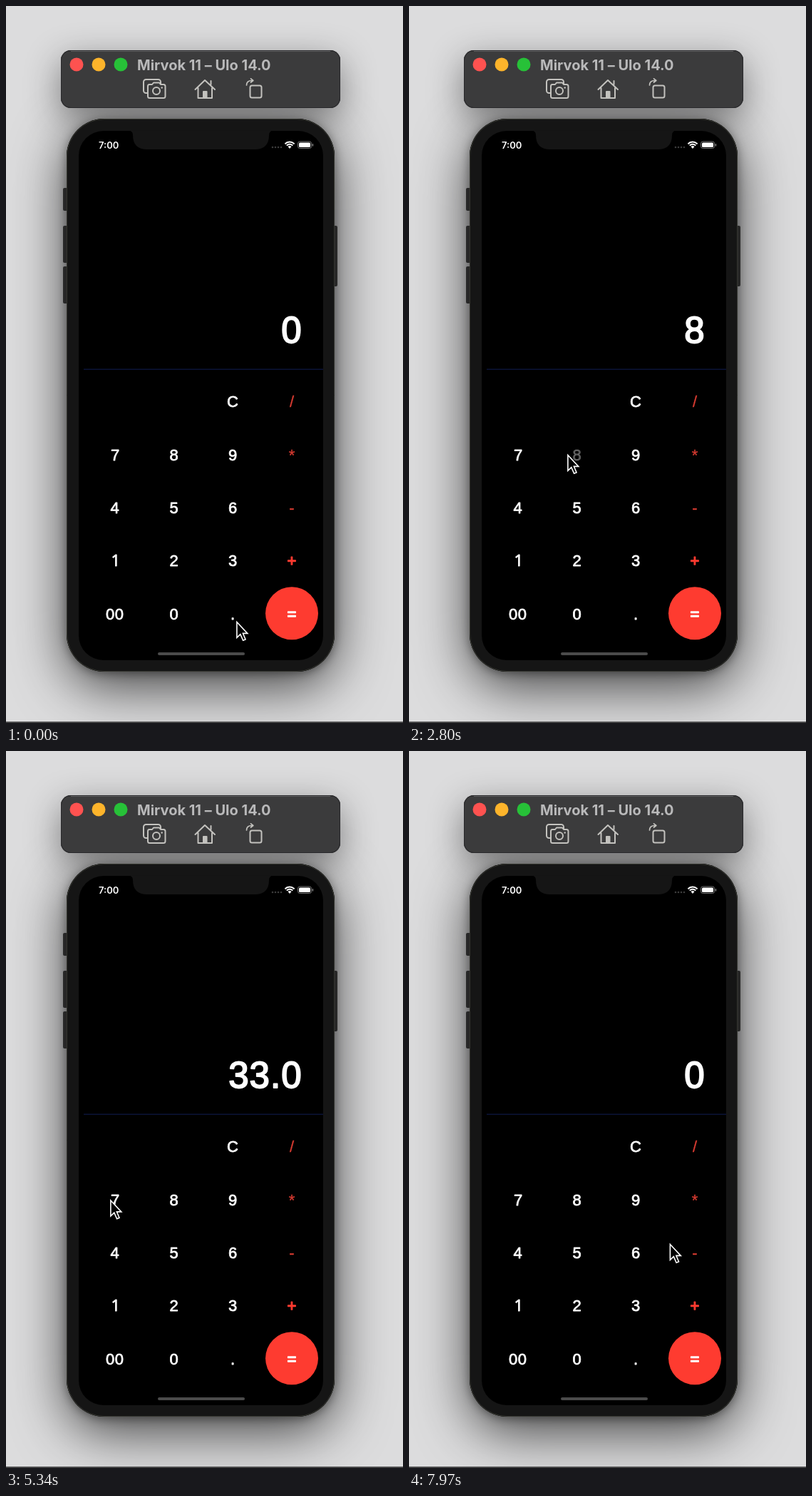
Recreate the animation shown at these times as an HTML page with a canvas. Size 557x1005 px, loop 8 s.

```html
<!DOCTYPE html>
<html lang="en">
<head>
<meta charset="utf-8">
<title>Calculator</title>
<style>
  html, body { margin: 0; width: 100%; height: 100%; overflow: hidden; background: #dcdcdd; }
  canvas { display: block; width: 100vw; height: 100vh; }
</style>
</head>
<body>
<canvas id="stage" width="557" height="1005"></canvas>
<script>
const W = 557, H = 1005, LOOP = 8000;
const RED = '#fe3b30', DIM_RED = '#d63b31', BODY = '#151515', ICON = '#c3c2be';
const view = document.getElementById('stage').getContext('2d');
const back = document.createElement('canvas');
back.width = W;
back.height = H;

// label, centre x, baseline, colour, extra weight
const keys = [
  ['C', 318, 562], ['/', 401, 562, DIM_RED],
  ['7', 153, 636.5], ['8', 235.5, 636.5], ['9', 318, 636.5], ['*', 401, 637, DIM_RED],
  ['4', 152.5, 711], ['5', 235.5, 711], ['6', 318, 711], ['-', 401, 711, DIM_RED],
  ['1', 152.5, 785], ['2', 235.5, 785], ['3', 318, 785], ['+', 401, 785, RED, .5],
  ['00', 152.5, 859.5], ['0', 235.5, 859.5], ['.', 318, 859.5], ['=', 401, 859.5, '#fff', .6]
];

// label, time down, time up
const taps = [
  ['2', 490, 600], ['5', 1000, 1110], ['+', 1600, 1710], ['8', 2650, 2780], ['=', 3610, 3720],
  ['/', 4540, 4650], ['7', 5420, 5530], ['=', 6400, 6510], ['C', 7510, 7620]
];

const readouts = [
  [0, '0'], [600, '2'], [1110, '25'], [2780, '8'], [3720, '33.0'],
  [5530, '7'], [6510, '4.71428571\n4285714'], [7620, '0']
];

// time, x, y of the pointer tip
const path = [
  [0, 323, 861.5], [430, 236, 778], [690, 236, 778], [930, 238, 704], [1180, 238, 704],
  [1490, 417, 766.5], [1850, 417, 766.5], [2480, 222, 627.5], [2900, 222, 627.5],
  [3500, 404, 853], [3880, 404, 853], [4340, 415.5, 583.5], [4490, 411, 563], [4780, 411, 563],
  [5340, 146, 628], [5680, 146, 628], [6220, 404, 852.5], [6700, 404, 852.5],
  [7170, 424, 625.5], [7460, 322, 556], [7700, 322, 556], [7970, 365.5, 689.5], [8000, 365.5, 689.5]
];

function box(c, x, y, w, h, r, fill, stroke, line = 1) {
  c.beginPath();
  c.roundRect(x, y, w, h, r);
  if (fill) { c.fillStyle = fill; c.fill(); }
  if (stroke) { c.strokeStyle = stroke; c.lineWidth = line; c.stroke(); }
}

function disc(c, x, y, r, fill) {
  c.beginPath();
  c.arc(x, y, r, 0, Math.PI * 2);
  c.fillStyle = fill;
  c.fill();
}

function line(c, d, color, width) {
  c.strokeStyle = color;
  c.lineWidth = width;
  c.stroke(new Path2D(d));
}

function castShadow(c, x, y, w, h, r, alpha, blur, drop) {
  c.save();
  c.shadowColor = `rgba(0,0,0,${alpha})`;
  c.shadowBlur = blur;
  c.shadowOffsetY = drop;
  box(c, x, y, w, h, r, BODY);
  c.restore();
}

function drawShadows(c) {
  castShadow(c, 77, 62, 392, 81, 14, .45, 50, 15);
  castShadow(c, 85, 158, 376, 775, 53, .72, 76, 20);
  castShadow(c, 85, 158, 376, 775, 53, .4, 14, 2);
}

function drawToolbar(c) {
  box(c, 77, 62, 392, 81, 14, '#3b3b3c');
  box(c, 77.5, 62.5, 391, 80, 13.5, null, '#28282b');
  line(c, 'M91 63.5H455', '#626263', 1);

  ['#fe5250', '#fdb42b', '#27c138'].forEach((color, i) => disc(c, 99 + 31 * i, 82, 9.5, color));
  c.fillStyle = '#b9b9ba';
  c.font = '700 20px Inter, "Open Sans", sans-serif';
  c.fillText('Mirvok 11 – Ulo 14.0', 184, 90);

  c.lineJoin = c.lineCap = 'round';
  // camera
  box(c, 193, 103, 24, 19, 3.5, null, ICON, 2);
  const cam = 'M201 110H205L207 107.5H215L217 110H221Q223.5 110 223.5 112.5V126.5Q223.5 129 221 129H201.5Q199 129 199 126.5V112.5Q199 110 201 110Z';
  c.fillStyle = '#3b3b3c';
  c.fill(new Path2D(cam));
  line(c, cam, ICON, 2);
  c.beginPath();
  c.arc(211, 119, 5, 0, Math.PI * 2);
  c.stroke();
  disc(c, 218.7, 114.5, 1.2, ICON);
  // house
  line(c, 'M265.5 117L279 104L293 117M269.5 115V129H289V115M287.5 110V105', ICON, 2);
  box(c, 276, 119, 6.5, 10, 1, ICON);
  // rotate
  box(c, 342.5, 111.5, 16, 17, 2.5, null, ICON, 2);
  line(c, 'M337.5 111Q337.5 104.5 345 104.5M343.5 101.8L346.8 104.5L343.5 107.2', ICON, 1.7);
}

function drawStatus(c) {
  c.fillStyle = '#fff';
  c.font = '600 13px Inter, "Open Sans", sans-serif';
  c.fillText('7:00', 130, 199.5);
  for (let i = 0; i < 4; i++) disc(c, 374 + 4 * i, 198, 1.3, '#3c3c3c');

  c.lineCap = 'butt';
  c.strokeStyle = '#fff';
  [[9, 2], [5.7, 2]].forEach(([r, w]) => {
    c.lineWidth = w;
    c.beginPath();
    c.arc(398, 199.5, r, -Math.PI * .76, -Math.PI * .24);
    c.stroke();
  });
  c.fillStyle = '#fff';
  c.fill(new Path2D('M398 200L395.5 197Q398 195.2 400.5 197Z'));

  box(c, 409.5, 190, 19, 9.5, 2.8, null, '#777');
  box(c, 411, 191.5, 16, 6.5, 1.6, '#fff');
  box(c, 429.7, 193, 1.4, 3.6, .7, '#888');
}

function drawPhone(c) {
  [[80, 255, 32], [80, 308, 52], [80, 365, 52], [458, 308, 85]]
    .forEach(([x, y, h]) => box(c, x, y, 7, h, 2, '#272727'));
  box(c, 85, 158, 376, 775, 53, BODY);
  box(c, 85.5, 158.5, 375, 774, 52.5, null, '#34352f');
  box(c, 102, 175, 343, 742, 35, '#000');

  c.fillStyle = BODY;
  c.fill(new Path2D('M172 174.5Q178 175 178 181Q178 201 198 201H349Q369 201 369 181Q369 175 375 174.5Z'));
  drawStatus(c);
  c.fillStyle = '#0b1338';
  c.fillRect(109, 508.5, 336, 1.5);
  box(c, 213, 906, 122, 4, 2, '#4b4b4b');
  disc(c, 401, 851.3, 37, RED);
}

function drawBack() {
  const c = back.getContext('2d');
  c.fillStyle = '#dcdcdd';
  c.fillRect(0, 0, W, H);
  drawShadows(c);
  drawToolbar(c);
  drawPhone(c);
  c.fillStyle = '#49494a';
  c.fillRect(0, 1003, W, 2);
}

const isDigit = ch => ch >= '0' && ch <= '9';
const face = (ch, size) => size + (ch === '1' ? 'px "Open Sans", sans-serif' : 'px "Liberation Sans", Arial, sans-serif');

function advance(ch, size) {
  if (isDigit(ch)) return size * .578;
  view.font = face(ch, size);
  return view.measureText(ch).width + size * .02;
}

const textWidth = (text, size) => [...text].reduce((sum, ch) => sum + advance(ch, size), 0);

// soft-cornered lettering: each glyph is filled and outlined with round joins
function rounded(text, x, y, size, color, weight) {
  view.fillStyle = view.strokeStyle = color;
  view.lineJoin = 'round';
  view.lineWidth = weight;
  view.textAlign = 'center';
  for (const ch of text) {
    const w = advance(ch, size);
    const mid = x + w / 2 + (ch === '1' ? size * .06 : 0);
    view.font = face(ch, size);
    view.fillText(ch, mid, y);
    view.strokeText(ch, mid, y);
    x += w;
  }
}

function keyAlpha(label, t) {
  for (const [name, down, up] of taps) {
    if (name !== label || t < down || t > up + 240) continue;
    return t < up ? .3 : .3 + .7 * Math.max(0, (t - up - 40) / 200);
  }
  return 1;
}

function drawKeys(t) {
  for (const [label, x, y, color = '#fff', extra = 0] of keys) {
    view.globalAlpha = keyAlpha(label, t);
    const thin = color === DIM_RED;
    rounded(label, x - textWidth(label, 22) / 2, y, 22, color, thin ? .35 : .8 + extra);
  }
  view.globalAlpha = 1;
}

function drawReadout(t) {
  const text = readouts.filter(([at]) => at <= t).pop()[1];
  const rows = text.split('\n');
  rows.forEach((row, i) => {
    const x = rows.length > 1 ? 134 : 415.2 - textWidth(row, 51);
    rounded(row, x, 472 - 58 * (rows.length - 1 - i), 51, '#fff', 1.9);
  });
}

function pointerAt(t) {
  const i = path.findIndex(p => p[0] > t);
  const [t0, x0, y0] = path[i - 1], [t1, x1, y1] = path[i];
  const u = (t - t0) / (t1 - t0), k = u * u * (3 - 2 * u);
  return [x0 + (x1 - x0) * k, y0 + (y1 - y0) * k];
}

const arrow = new Path2D('M.9 2V23.8L5.8 19.2L9.6 27.8L13 26.3L9.4 17.9H15.8Z');

function drawPointer(t) {
  const [x, y] = pointerAt(t);
  view.save();
  view.translate(x, y);
  view.lineJoin = 'miter';
  view.fillStyle = '#000';
  view.strokeStyle = '#fff';
  view.lineWidth = 1.6;
  view.fill(arrow);
  view.stroke(arrow);
  view.restore();
}

function render(now) {
  const t = now % LOOP;
  view.drawImage(back, 0, 0);
  drawReadout(t);
  drawKeys(t);
  drawPointer(t);
}

drawBack();
const start = performance.now();
function tick() {
  render(performance.now() - start);
  requestAnimationFrame(tick);
}
tick();
</script>
</body>
</html>
```
